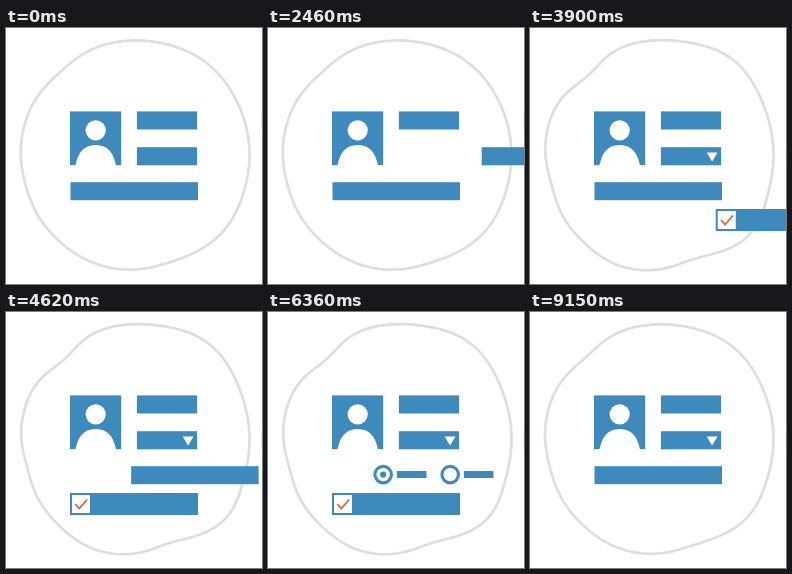
Write an HTML page with a canvas that moves like this. It is 256x256 px and loops after 9180 ms.

```html
<!DOCTYPE html>
<html lang="en">
<head>
<meta charset="utf-8">
<title>Form builder</title>
<style>
html, body { margin: 0; width: 100%; height: 100%; overflow: hidden; background: #fff; }
canvas { display: block; width: 256px; height: 256px; }
</style>
</head>
<body>
<canvas id="stage" width="256" height="256"></canvas>
<script>
const ctx = document.getElementById('stage').getContext('2d');
const LOOP = 9180, TICK = 30, WOBBLE = 150;
const BLUE = '#3e8abd', LINE = '#dedede', TICK_COLOR = '#e0602c';
const ROW1 = 83.4, ROW2 = 119.2, ROW3 = 154.2;
const FIELD_X = 130.9, LEFT = 64, BAR_X = 64.5;
const PARKED = 255.9, OFF_RIGHT = 262, OFF_LEFT = -130;

// Bumps on a circle: angle and spread in degrees, height in pixels
const bumps = [
  { angle: -52, spread: 22, height: 6 },
  { angle: 40, spread: 16, height: 6 },
  { angle: 72, spread: 14, height: -5 },
  { angle: 110, spread: 18, height: 3 },
  { angle: 165, spread: 14, height: -3 },
  { angle: 228, spread: 15, height: -8 },
];
const strengths = [0.35, 0.6, 1, 0.6];

const ease = p => p < 0.5 ? 4 * p ** 3 : 1 - 4 * (1 - p) ** 3;
function move(t, start, span, from, to) {
  const p = Math.min(1, Math.max(0, (t - start) / span));
  return from + (to - from) * ease(p);
}

function rect(x, y, w, h, color = BLUE) {
  ctx.fillStyle = color;
  ctx.fillRect(x, y, w, h);
}

function disc(x, y, r, color) {
  ctx.fillStyle = color;
  ctx.beginPath();
  ctx.arc(x, y, r, 0, Math.PI * 2);
  ctx.fill();
}

function outline(strength) {
  ctx.beginPath();
  for (let deg = -90; deg < 270; deg += 2) {
    let r = 114.5;
    for (const b of bumps) {
      const gap = ((deg - b.angle + 540) % 360 - 180) / b.spread;
      r += strength * b.height * Math.exp(-gap * gap);
    }
    const a = deg * Math.PI / 180;
    ctx.lineTo(129 + r * Math.cos(a), 127 + r * Math.sin(a));
  }
  ctx.closePath();
  ctx.strokeStyle = LINE;
  ctx.lineWidth = 2.7;
  ctx.stroke();
}

function avatar() {
  rect(LEFT, ROW1, 51.2, 53.8);
  disc(89.7, 102.3, 10.1, '#fff');
  ctx.beginPath();
  ctx.moveTo(69.3, 138);
  ctx.bezierCurveTo(71.5, 126, 77, 117, 89.7, 117);
  ctx.bezierCurveTo(102.4, 117, 107.9, 126, 110.1, 138);
  ctx.fill();
}

const field = (x, y) => rect(x, y, 60.2, 18.1);

function dropdown(x) {
  field(x, ROW2);
  ctx.fillStyle = '#fff';
  ctx.beginPath();
  ctx.moveTo(x + 45.8, 124.5);
  ctx.lineTo(x + 56.6, 124.5);
  ctx.lineTo(x + 51.2, 133.4);
  ctx.fill();
}

function checkbox(x) {
  rect(x, 181, 128, 22);
  rect(x + 2, 183, 18, 18, '#fff');
  ctx.beginPath();
  ctx.moveTo(x + 5.3, 192);
  ctx.lineTo(x + 9.3, 196.5);
  ctx.lineTo(x + 17.2, 187.5);
  ctx.strokeStyle = TICK_COLOR;
  ctx.lineWidth = 1.7;
  ctx.stroke();
}

function radio(x, on) {
  disc(x + 10, 162.6, 9.8, BLUE);
  disc(x + 10, 162.6, 6.7, '#fff');
  if (on) disc(x + 10, 162.6, 3.1, BLUE);
  rect(x + 23.7, 159, 29.6, 7);
}

function draw(t) {
  const secondHalf = t > 6000;
  rect(0, 0, 256, 256, '#fff');
  outline(strengths[Math.floor(t / WOBBLE) % strengths.length]);
  avatar();

  // Right column: swap the lower field for a dropdown, then renew the upper one
  field(move(t, 1580, 600, FIELD_X, PARKED), ROW2);
  dropdown(move(t, 2189, 600, OFF_RIGHT, FIELD_X));
  field(FIELD_X, move(t, 2460, 540, ROW1, -20));
  field(move(t, 2978, 600, PARKED, FIELD_X), ROW1);

  // Wide bar gives way to radio buttons and comes back
  const barX = secondHalf
    ? move(t, 6712, 1050, OFF_RIGHT, BAR_X)
    : move(t, 4365, 600, BAR_X, OFF_RIGHT);
  rect(barX, ROW3, 127.5, 18);

  const radioX = secondHalf
    ? move(t, 6139, 600, LEFT, 270)
    : move(t, 5160, 600, OFF_LEFT, LEFT);
  radio(radioX, true);
  radio(radioX + 67, false);

  checkbox(secondHalf
    ? move(t, 6500, 660, LEFT, OFF_LEFT)
    : move(t, 3570, 720, OFF_RIGHT, LEFT));
}

let begin = null;
function frame(now) {
  if (begin === null) begin = now;
  const t = (now - begin) % LOOP;
  draw(Math.floor(t / TICK + 1e-6) * TICK);
  requestAnimationFrame(frame);
}
draw(0);
requestAnimationFrame(frame);
</script>
</body>
</html>
```
